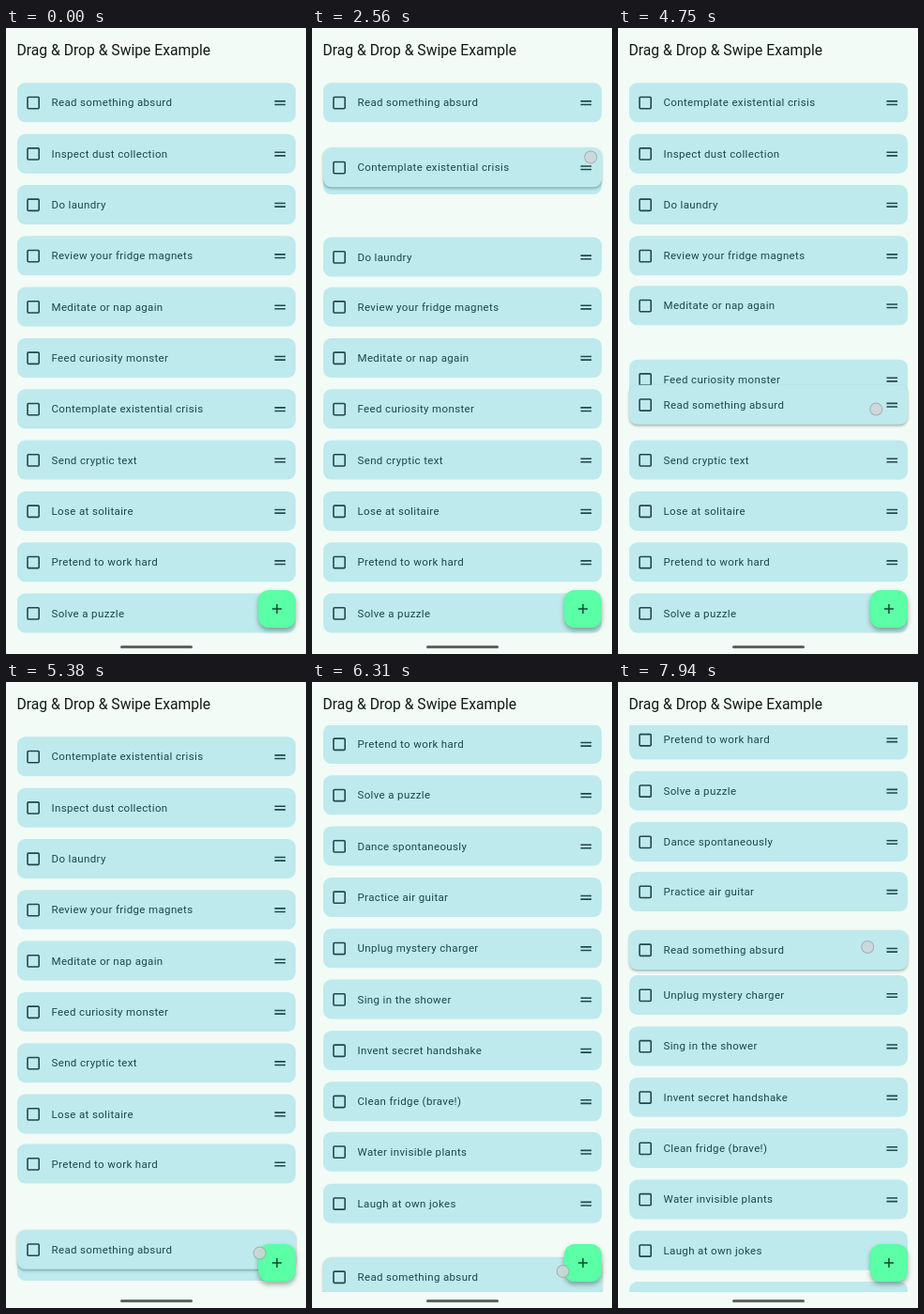
Animation, 320 px wide and 666 px high, one loop 8 s. Source, as an HTML page:

```html
<!DOCTYPE html>
<html lang="en">
<head>
<meta charset="utf-8">
<title>Drag and drop list</title>
<style>
html, body { margin: 0; width: 100%; height: 100%; overflow: hidden; }
body { position: relative; background: #f2fbf5; font-family: Roboto, sans-serif; }
h1 {
  position: absolute; left: 11.5px; top: 13px; margin: 0;
  font-size: 15.68px; font-weight: 400; line-height: 21px; color: #121a18; white-space: nowrap;
}
#list {
  position: absolute; left: 0; top: 46px; width: 320px; height: 603px;
  overflow: hidden; isolation: isolate;
}
.card {
  position: absolute; left: 11.5px; top: -67.4px; width: 297.5px; height: 42.8px;
  border-radius: 8.6px; background: #beeaed; color: #1d464a;
}
.card span {
  position: absolute; left: 37px; top: 0; line-height: 42.8px;
  font-size: 11.5px; letter-spacing: .36px; white-space: nowrap;
}
svg { position: absolute; left: 0; top: 0; width: 100%; height: 100%; fill: none; stroke: #23474b; stroke-width: 1.6; }
#fab {
  position: absolute; left: 269px; top: 598px; width: 40px; height: 40px;
  border-radius: 11.5px; background: #5affa6; box-shadow: 0 3px 5px rgba(0, 30, 20, .36);
}
#fab svg { stroke: #16492f; stroke-width: 1.5; }
#bar {
  position: absolute; left: 121.5px; top: 656.7px; width: 77.5px; height: 3px;
  border-radius: 2px; background: #5c6460;
}
#dot {
  position: absolute; left: -7px; top: -7px; width: 14px; height: 14px; box-sizing: border-box;
  border: 1px solid rgba(130, 142, 144, .55); border-radius: 50%; background: rgba(206, 214, 214, .86);
}
</style>
</head>
<body>
<h1>Drag &amp; Drop &amp; Swipe Example</h1>
<div id="list"></div>
<div id="fab"><svg><path d="M15 20h10M20 15v10"/></svg></div>
<div id="bar"></div>
<div id="dot"></div>
<script>
const LOOP = 8000, TOP = 79.3, PITCH = 54.33, REACH = 26;

const names = [
  'Read something absurd', 'Inspect dust collection', 'Do laundry', 'Review your fridge magnets',
  'Meditate or nap again', 'Feed curiosity monster', 'Contemplate existential crisis',
  'Send cryptic text', 'Lose at solitaire', 'Pretend to work hard', 'Solve a puzzle',
  'Dance spontaneously', 'Practice air guitar', 'Unplug mystery charger', 'Sing in the shower',
  'Invent secret handshake', 'Clean fridge (brave!)', 'Water invisible plants',
  'Laugh at own jokes', 'Count the clouds'
];
const slotY = slot => TOP + slot * PITCH;

// Each drag: card, touch span, sideways drift of the finger, path of the card centre.
const drags = [
  {
    item: 6, down: 1600, up: 3200, x: [294, 299],
    path: [[1700, slotY(6)], [2560, 148.5], [3200, 73], [3380, slotY(0)]]
  },
  {
    item: 0, down: 3790, up: LOOP + 200, x: [293, 266],
    path: [[3800, slotY(1)], [4750, 400.5], [5700, 650], [5810, 642], [6310, 633],
           [7000, 585], [7580, 240], [LOOP, 287.5]]
  }
];
const scrollKeys = [[5430, 0], [5810, 202.6], [6130, 390], [6325, 452.5]];

const clamp = v => Math.max(0, Math.min(1, v));
const slope = (keys, j) => (keys[j + 1][1] - keys[j][1]) / (keys[j + 1][0] - keys[j][0]);

function linear(keys, t) {
  const i = keys.findIndex(k => k[0] > t);
  if (i === 0) return keys[0][1];
  if (i < 0) return keys[keys.length - 1][1];
  return keys[i][1] + slope(keys, i - 1) * (t - keys[i][0]);
}

// Cubic through the keys, flat at turning points.
function smooth(keys, t) {
  const i = keys.findIndex(k => k[0] > t);
  if (i === 0) return keys[0][1];
  if (i < 0) return keys[keys.length - 1][1];
  const tangent = j => {
    if (j === 0 || j === keys.length - 1) return 0;
    const p = slope(keys, j - 1), q = slope(keys, j);
    return p * q > 0 ? 2 * p * q / (p + q) : 0;
  };
  const [t0, a] = keys[i - 1], [t1, b] = keys[i];
  const d = t1 - t0, u = (t - t0) / d, v = 1 - u;
  return a * v * v * (1 + 2 * u) + b * u * u * (3 - 2 * u)
    + d * u * v * (tangent(i - 1) * v - tangent(i) * u);
}

// Remaining distance of a slightly bouncy spring.
function spring(ms) {
  const z = .76, x = 23 * ms / 1000, r = Math.sqrt(1 - z * z);
  return Math.exp(-z * x) * (Math.cos(r * x) + z / r * Math.sin(r * x));
}

// Walk through both drags once and note when neighbours trade places.
function findSwaps() {
  const order = names.map((_, i) => i), swaps = [];
  for (const { item, path } of drags) {
    for (let t = path[0][0]; t <= path[path.length - 1][0]; t += 2) {
      const y = smooth(path, t) + linear(scrollKeys, t);
      const slot = order.indexOf(item);
      for (const dir of [-1, 1]) {
        const next = slot + dir;
        if (next < 0 || next >= order.length) continue;
        if ((y - slotY(next)) * dir > -REACH) {
          const other = order[next];
          order[next] = item;
          order[slot] = other;
          swaps.push({ t, item, other, dir });
          break;
        }
      }
    }
  }
  return swaps;
}

const swaps = findSwaps();
const list = document.getElementById('list');
const dot = document.getElementById('dot');
const cards = names.map(name => {
  const card = document.createElement('div');
  card.className = 'card';
  card.innerHTML = '<svg><rect x="11" y="15.2" width="12.2" height="12.2" rx="1"/>'
    + '<path d="M274.5 19.6h11.6M274.5 23.2h11.6"/></svg><span></span>';
  card.querySelector('span').textContent = name;
  list.append(card);
  return card;
});

function draw(t) {
  const scroll = linear(scrollKeys, t);
  const ys = names.map((_, i) => slotY(i) - scroll);
  for (const s of swaps) {
    if (s.t > t) break;
    ys[s.item] += s.dir * PITCH;
    ys[s.other] -= s.dir * PITCH * (1 - spring(t - s.t));
  }

  const lift = names.map(() => 0);
  let touch = 0;
  for (const { item, down, up, x, path } of drags) {
    const start = path[0][0], end = path[path.length - 1][0];
    if (t >= start && t <= end) {
      ys[item] = smooth(path, t);
      lift[item] = clamp((t - start) / 120) * clamp((up + 150 - t) / 150);
    }
    if (t >= down && t < up) {
      // The finger runs a little ahead of the card.
      const left = x[1] + (x[0] - x[1]) * Math.exp((down - t) / 900);
      const top = smooth(path, t + 35) - 5;
      touch = clamp((t - down + 30) / 60);
      dot.style.transform = `translate(${left}px, ${top}px)`;
    }
  }
  dot.style.opacity = touch;

  cards.forEach((card, i) => {
    card.style.transform = `translateY(${ys[i]}px)`;
    card.style.zIndex = lift[i] > 0 ? 1 : 0;
    card.style.boxShadow = lift[i] > 0 ? `0 1.5px 3px rgba(0, 25, 30, ${.34 * lift[i]})` : 'none';
  });
}

const began = performance.now();
function tick() {
  draw((performance.now() - began) % LOOP);
  requestAnimationFrame(tick);
}
tick();
</script>
</body>
</html>
```
